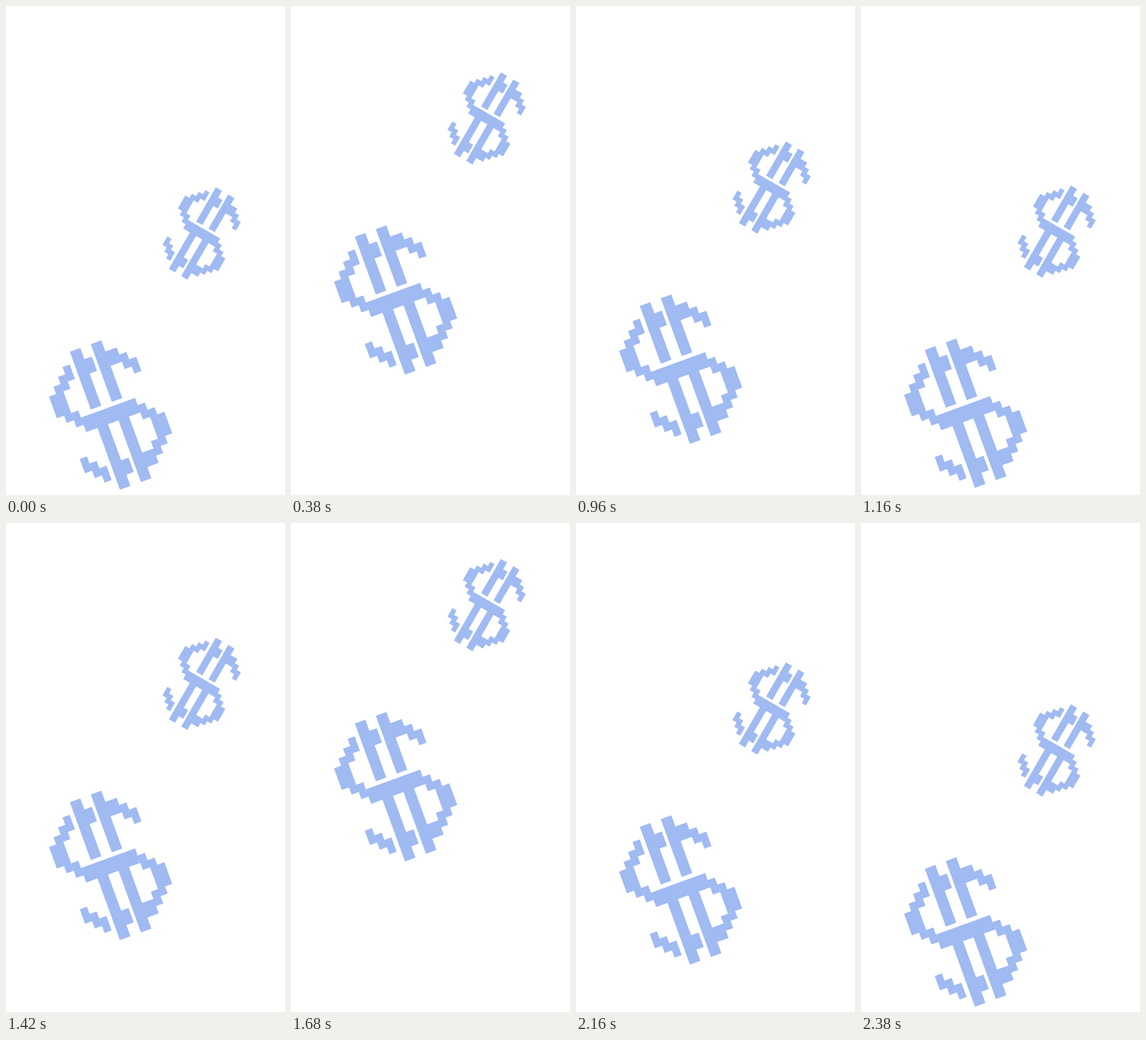
An HTML page with a canvas that plays this animation: 400x700 px, repeating every 2.44 s.

```html
<!DOCTYPE html>
<html lang="en">
<head>
<meta charset="utf-8">
<title>Bouncing dollars</title>
<style>
  html, body { margin: 0; width: 100%; height: 100%; overflow: hidden; background: #fff; }
  canvas { display: block; }
</style>
</head>
<body>
<canvas id="stage" width="400" height="700"></canvas>
<script>
const ctx = document.getElementById('stage').getContext('2d');
const COLOR = '#a0baf2';
const LOOP = 2440, STEP = 20, HEIGHT = 260, RISE = 600;
const BOUNCES = [{ start: 0, fall: 600 }, { start: 1200, fall: 580 }];

// Pixel-style dollar sign around its centre: left, top, right, bottom.
const dollar = new Path2D();
function block(left, top, right, bottom) {
  dollar.rect(left, top, right - left, bottom - top);
}
function buildDollar() {
  const row = 11;
  const col = n => 8.6 + n * 10.9;
  const near = col(2), a = col(3), b = col(4), c = col(5), d = col(6);

  // Vertical bars with their small flags
  for (const x of [-24, 8]) {
    block(x, -105, x + 16, -17);
    block(x, 0, x + 16, 105);
  }
  block(-8, -8 * row, 3.3, -6 * row);
  block(-8, 6 * row, 3.3, 8 * row);

  // Middle stroke
  block(-a, -row, a, row);

  // Upper left bowl
  block(-a, -8 * row, -near, -6 * row);
  block(-b, -7 * row, -near, -6 * row);
  block(-c, -6 * row, -a, -5 * row);
  block(-b, -7 * row, -a, -5 * row);
  block(-d, -5 * row, -b, -2 * row);
  block(-c, -6 * row, -b, -row);
  block(-b, -2 * row, -a, 0);

  // Lower right bowl
  block(24, 6 * row, a, 8 * row);
  block(a, 5 * row, b, 7 * row);
  block(b, row, c, 6 * row);
  block(c, 2 * row, d, 5 * row);
  block(a, 0, b, 2 * row);

  // Tails
  block(24, -8 * row, a, -6 * row);
  block(a, -7 * row, b, -5 * row);
  block(b, -6 * row, c, -4 * row);
  block(-a, 6 * row, -near, 8 * row);
  block(-b, 5 * row, -a, 7 * row);
  block(-c, 4 * row, -b, 6 * row);
}

// Cubic Bezier easing, solved for x by bisection
function bezier(x1, y1, x2, y2) {
  const at = (p, q, u) => 3 * (1 - u) * (1 - u) * u * p + 3 * (1 - u) * u * u * q + u * u * u;
  return x => {
    let lo = 0, hi = 1;
    for (let i = 0; i < 30; i++) {
      const mid = (lo + hi) / 2;
      if (at(x1, x2, mid) < x) lo = mid; else hi = mid;
    }
    return at(y1, y2, (lo + hi) / 2);
  };
}
const settle = bezier(1 / 6, 1 / 6, 2 / 3, 1);

function lift(time) {
  const { start, fall } = BOUNCES[time < BOUNCES[1].start ? 0 : 1];
  const t = time - start;
  if (t <= RISE) return HEIGHT * t / RISE;
  const progress = (t - RISE) / fall;
  return progress >= 1 ? 0 : HEIGHT * (1 - settle(progress));
}

function drawDollar(x, y, degrees, scale) {
  ctx.save();
  ctx.translate(x, y);
  ctx.rotate(degrees * Math.PI / 180);
  ctx.scale(scale, scale);
  ctx.fill(dollar);
  ctx.restore();
}

function render(now) {
  const time = Math.floor((now % LOOP) / STEP) * STEP;
  const up = lift(time);
  ctx.fillStyle = '#fff';
  ctx.fillRect(0, 0, 400, 700);
  ctx.fillStyle = COLOR;
  drawDollar(150, 585.5 - up, -20, 1);
  drawDollar(280.5, 325.6 - up, 30, 0.6415);
}

buildDollar();
let origin;
function tick(now) {
  origin ??= now;
  render(Math.max(0, now - origin));
  requestAnimationFrame(tick);
}
render(0);
requestAnimationFrame(tick);
</script>
</body>
</html>
```
